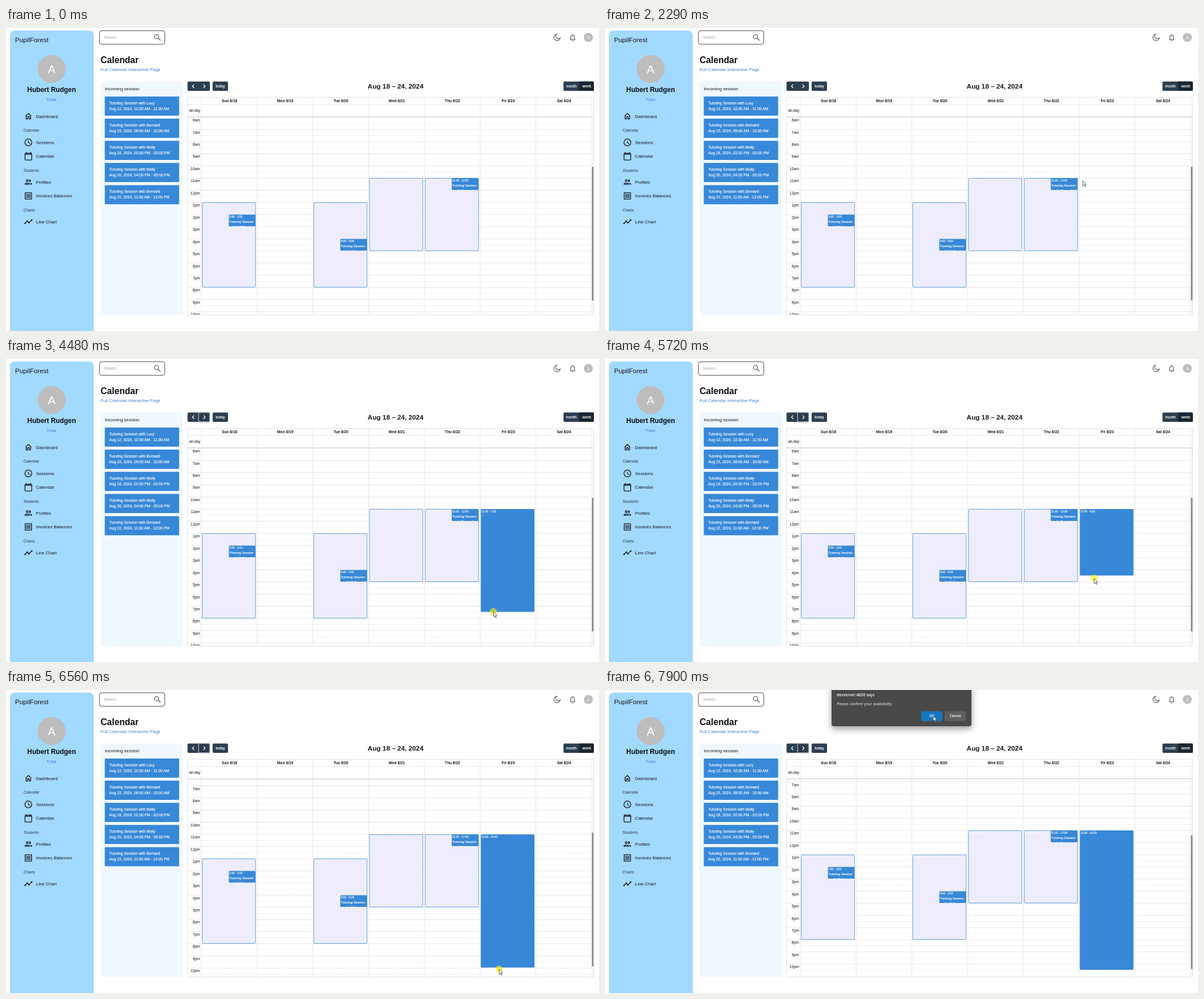
Write an HTML page that moves like this. It is 1047x535 px and loops after 8 s.

```html
<!DOCTYPE html>
<html lang="en">
<head>
<meta charset="utf-8">
<title>Tutor calendar</title>
<style>
html, body { margin: 0; width: 100%; height: 100%; overflow: hidden; background: #fff; }
svg { display: block; font-family: "Liberation Sans", Arial, sans-serif; }
.dialog text { font-family: "Open Sans", sans-serif; }
</style>
</head>
<body>
<svg id="stage" width="1047" height="535" viewBox="0 0 1047 535" xmlns="http://www.w3.org/2000/svg"></svg>
<script>
const LOOP = 8000;
const BLUE = '#3788d8', DARK = '#2c3e50', LINE = '#dddddd', INK = '#14171a';
const TOP = 158, BOTTOM = 506, HOUR = 21.45, SLOT = HOUR / 2, ELEVEN = 265;
const COL0 = 345, COL = 98.43, RIGHT = 1037.5;

const rect = (x, y, w, h, fill, extra = '') =>
  `<rect x="${x}" y="${y}" width="${w}" height="${h}" fill="${fill}" ${extra}/>`;
const line = (x1, y1, x2, y2, extra = '') =>
  `<path d="M${x1} ${y1}L${x2} ${y2}" stroke="${LINE}" stroke-width=".7" fill="none" ${extra}/>`;
// Text is placed by its vertical centre.
const text = (x, cy, s, size, fill = INK, extra = '') =>
  `<text x="${x}" y="${(cy + size * .355).toFixed(2)}" font-size="${size}" fill="${fill}" ${extra}>${s}</text>`;
const bold = 'font-weight="700"', mid = 'text-anchor="middle"';
const firm = 'stroke="#fff" stroke-width=".15"';
const icon = (cx, cy, body, scale = .66, color = INK) =>
  `<g transform="translate(${cx} ${cy}) scale(${scale}) translate(-12 -12)" fill="none" stroke="${color}" stroke-width="2">${body}</g>`;
const path = (d, extra = '') => `<path d="${d}" ${extra}/>`;
const hourY = h => ELEVEN + (h - 11) * HOUR;
const clock = h => `${(Math.floor(h) + 11) % 12 + 1}:${h % 1 ? '30' : '00'}`;
const span = (a, b) => `${clock(a)} - ${clock(b)}`;

function sidebar() {
  const items = [
    [156, 'Dashboard', path('M4.5 11.2L12 4.4l7.5 6.8M6 10.5V19h4v-6h4v6h4v-8.5')],
    [202, 'Sessions', '<circle cx="12" cy="12" r="9.2"/>' + path('M12 7v5.5l4.5 2.8', 'stroke-width="1.7"')],
    [226.5, 'Calendar', '<rect x="3" y="4" width="18" height="18" rx="1.5"/>' + path('M3 7h18M6 1v3M18 1v3')],
    [272, 'Profiles', '<circle cx="9" cy="8.5" r="2.6"/>' +
      path('M3 18v-.8c0-3.2 12-3.2 12 0v.8z') +
      path('M14 5.2a3.5 3.5 0 1 1 0 6.6q1.5-3.3 0-6.6zM16 13.8c3 .4 6 1.5 6 3.5V19h-4v-1.7q0-2-2-3.5z', `fill="${INK}" stroke="none"`)],
    [296.5, 'Invoices Balances', path('M3.5 3v18M20.5 3v18M3 3.5h18M3 20.5h18M6 8h12M6 12h12M6 16h12')],
    [342, 'Line Chart', path('M3 16.5l6-6 4.5 4.5 7.5-7.5') +
      [[3, 16.5], [9, 10.5], [13.5, 15], [21, 7.5]].map(([x, y]) => `<circle cx="${x}" cy="${y}" r="1" fill="${INK}"/>`).join('')]
  ];
  return rect(7, 4.5, 148, 545, '#a2d9ff', 'rx="8"') +
    text(16, 21, 'PupilForest', 11.7) +
    '<circle cx="80.5" cy="72.5" r="24.7" fill="#bdbdbd"/>' +
    text(80.5, 72.5, 'A', 20.5, '#fff', mid) +
    text(80.5, 109, 'Hubert Rudgen', 11.9, '#0c0f12', bold + ' ' + mid) +
    text(80.5, 126, 'Tutor', 7.84, '#3b82d9', mid) +
    items.map(([y, label, body]) => icon(39.5, y, body) + text(53, y, label, 7.9)).join('') +
    [[181, 'Calendar'], [251.5, 'Students'], [322, 'Charts']].map(([y, s]) => text(31, y, s, 6.9, '#2b3a45')).join('');
}

function topBar() {
  return rect(165, 4.8, 115.3, 24, '#fff', 'rx="4" stroke="#333" stroke-width=".9"') +
    text(173, 16.5, 'Search', 6.9, '#a0a0a0') +
    icon(267.5, 16.8, '<circle cx="9.5" cy="9.5" r="5.6"/>' + path('M14 14l6 6', 'stroke-width="2.3"'), .66, '#666') +
    icon(973, 16.5, path('M20.5 14a8.7 8.7 0 1 1-10-10.3 7 7 0 0 0 10 10.3z'), .64, '#666') +
    icon(1000.5, 16.8, path('M5 18h14M7 18v-7c0-7.4 10-7.4 10 0v7M12 5V2.8') +
      path('M10 20.3h4a2 2 0 0 1-4 0z', 'fill="#666" stroke="none"'), .64, '#666') +
    '<circle cx="1028.2" cy="16.7" r="7.9" fill="#bdbdbd"/>' + text(1028.2, 16.8, 'A', 8.2, '#fff', mid) +
    text(167, 56.7, 'Calendar', 15.7, '#0c0f12', bold) +
    text(167, 73.5, 'Full Calendar Interactive Page', 7.87, '#3b82d9');
}

function incoming() {
  const rows = [
    ['Lucy', 'Aug 12, 2024, 10:30 AM - 11:30 AM'],
    ['Bernard', 'Aug 15, 2024, 09:00 AM - 10:00 AM'],
    ['Molly', 'Aug 18, 2024, 02:00 PM - 03:00 PM'],
    ['Molly', 'Aug 20, 2024, 04:00 PM - 05:00 PM'],
    ['Bernard', 'Aug 22, 2024, 11:00 AM - 12:00 PM']
  ];
  return rect(167, 94.5, 145.5, 412.5, '#f0f8ff') +
    text(174.2, 106.7, 'Incoming session', 7.95) +
    rows.map(([who, when], i) => {
      const y = 121 + i * 39.1;
      return rect(174.4, y, 131.3, 33.8, BLUE, 'rx="1"') +
        text(182.2, y + 11.6, 'Tutoring Session with ' + who, 6.72, '#fff', firm) +
        text(182.2, y + 21.6, when, 6.72, '#fff', firm);
    }).join('');
}

function toolbar() {
  const chevron = (x, d) => path(`M${x} 99.6l${d} 3.2l${-d} 3.2`, 'fill="none" stroke="#fff" stroke-width="1.3"');
  return rect(320.5, 94.5, 39.5, 16.6, DARK, 'rx="2"') +
    '<rect id="ring" x="340" y="94.5" width="19.6" height="16.4" rx="2" fill="#2a3b4c" stroke="#97a0aa" stroke-width="1.6"/>' +
    chevron(332.2, -3) + chevron(348.6, 3) +
    rect(364.8, 94.5, 27.2, 16.6, DARK, 'rx="2"') + text(378.4, 102.8, 'today', 6.72, '#fff', mid + ' ' + firm) +
    rect(984.3, 94.5, 53.7, 16.6, DARK, 'rx="2"') +
    path('M1012 94.5h24a2 2 0 0 1 2 2v12.6a2 2 0 0 1-2 2h-24z', 'fill="#1a252f"') +
    text(998.4, 102.8, 'month', 6.72, '#fff', mid + ' ' + firm) + text(1025.3, 102.8, 'week', 6.72, '#fff', mid + ' ' + firm) +
    text(687.8, 102.5, 'Aug 18 – 24, 2024', 11.8, INK, bold + ' ' + mid);
}

function availability(day, from, to) {
  const x = COL0 + day * COL + 1.6, y = hourY(from);
  return rect(x, y + .3, 94, (to - from) * HOUR - .8, '#eeedfd', `rx="1.6" stroke="${BLUE}" stroke-width=".75"`) +
    text(x + 1.4, y + 4, span(from, to), 4.9, '#fff', 'opacity=".75"');
}

function session(day, hour, who) {
  const x = COL0 + day * COL + 48.3, y = hourY(hour), id = 'clip' + day;
  return `<clipPath id="${id}">${rect(x, y, 47.2, 20.9, '#000')}</clipPath><g clip-path="url(#${id})">` +
    rect(x, y, 47.2, 20.9, BLUE, 'rx="1.6"') +
    text(x + 1, y + 4.2, span(hour, hour + 1), 4.9, '#fff', firm) +
    text(x + 1, y + 13, 'Tutoring Session', 5.72, '#fff', firm) +
    text(x + 5.5, y + 21.7, 'with ' + who, 5.72, '#fff', firm) + '</g>';
}

function calendar() {
  const days = ['Sun', 'Mon', 'Tue', 'Wed', 'Thu', 'Fri', 'Sat'];
  let head = '', slots = '';
  days.forEach((d, i) => {
    const x = COL0 + i * COL;
    head += line(x, 122.3, x, BOTTOM) + text(x + COL / 2 + .4, 128.5, `${d} 8/${18 + i}`, 6.65, INK, bold + ' ' + mid);
  });
  head += line(1034.2, 122.3, 1034.2, BOTTOM) + line(320.5, 135, RIGHT, 135) +
    text(343, 145.7, 'all-day', 6.72, INK, 'text-anchor="end"') +
    rect(320.5, 155.7, 717, 2.3, '#e4e4e4');
  for (let h = 5; h < 23; h++) {
    const y = hourY(h);
    slots += line(320.5, y, 1034, y) + line(320.5, y + SLOT, COL0, y + SLOT, 'opacity=".25"') +
      line(COL0, y + SLOT, 1034, y + SLOT, 'stroke-dasharray=".7 .7"') +
      text(342.6, y + 5, `${(h + 11) % 12 + 1}${h < 12 ? 'am' : 'pm'}`, 6.72, INK, 'text-anchor="end"');
  }
  const selX = COL0 + 5 * COL + 1.2;
  return head +
    `<clipPath id="view">${rect(320, TOP, 714.5, BOTTOM - TOP, '#000')}</clipPath>` +
    `<g clip-path="url(#view)"><g id="scroller">${slots}` +
    availability(0, 13, 20) + availability(2, 13, 20) + availability(3, 11, 17) + availability(4, 11, 17) +
    session(0, 14, 'Molly') + session(2, 16, 'Molly') + session(4, 11, 'Bernard') +
    `<g id="selection"><rect id="selBox" x="${selX}" y="${ELEVEN}" width="94.8" height="10" rx="1.6" fill="${BLUE}"/>` +
    text(selX + 1.2, ELEVEN + 4.1, '', 4.9, '#fff', 'id="selLabel" ' + firm) + '</g></g></g>' +
    rect(1034.4, TOP, 3.4, BOTTOM - TOP, '#f7f7f7') +
    '<rect id="thumb" x="1034.5" y="245" width="3.2" height="236" fill="#878787"/>' +
    rect(320.5, 122.3, 717, 384.2, 'none', `stroke="${LINE}" stroke-width=".8"`);
}

function dialog() {
  return '<g id="dialog" class="dialog">' +
    path('M400 -10h247v70q0 4-4 4h-239q-4 0-4-4z', 'fill="#4a4a4a" filter="url(#shadow)"') +
    text(409.3, 8.5, 'devserver:4826 says', 6.9, '#fff', 'font-weight="600"') +
    text(409.3, 24.3, 'Please confirm your availability', 6.72, '#f2f2f2') +
    rect(558.5, 37.5, 37.2, 17.5, '#1675bf', 'rx="2"') + text(577, 46, 'OK', 6.4, '#fff', mid + ' font-weight="600"') +
    rect(600, 37.5, 37.4, 17.5, '#5e5e5e', 'rx="2"') + text(618.7, 46, 'Cancel', 6.2, '#fff', mid + ' font-weight="600"') +
    '</g>';
}

const stage = document.getElementById('stage');
stage.innerHTML =
  `<defs><filter id="shadow" x="-20%" y="-20%" width="140%" height="170%">
    <feDropShadow dx="0" dy="5" stdDeviation="6" flood-color="#000" flood-opacity=".38"/></filter>
  <radialGradient id="glow"><stop offset=".82" stop-color="#ffee00" stop-opacity=".62"/>
    <stop offset="1" stop-color="#ffee00" stop-opacity=".4"/></radialGradient></defs>` +
  rect(0, 0, 1047, 535, '#fff') + sidebar() + topBar() + incoming() + toolbar() + calendar() + dialog() +
  `<g id="pointer"><circle id="halo" r="6.4" fill="url(#glow)"/>` +
  path('M.3 .2V9.3L2.4 7.4 3.9 10.8 5.3 10.2 3.8 6.9H6.5z', 'fill="#fff" stroke="#222" stroke-width=".7" stroke-linejoin="round"') + '</g>';

const el = id => document.getElementById(id);
const show = (id, on) => el(id).setAttribute('visibility', on ? 'visible' : 'hidden');

// Time, x and y of the pointer tip.
const route = [
  [230, 1030, 560], [300, 1005, 527], [450, 940, 430], [620, 882, 346], [780, 855, 300], [920, 859, 283],
  [1050, 859, 283], [1300, 852, 267], [1470, 849.5, 272], [1600, 849.5, 272], [1740, 849, 270.5],
  [2020, 849, 270.5], [2290, 843.5, 269.5], [3080, 843.5, 269.5], [3150, 845, 282], [3430, 856, 347],
  [3930, 858.5, 400], [4480, 860.5, 446], [4760, 861.5, 471], [4830, 861.5, 474], [5000, 862, 465],
  [5420, 863, 392], [5590, 863, 381], [5650, 863, 381], [5720, 863.3, 387], [6000, 866, 440],
  [6300, 870, 488], [6420, 870.5, 492.7], [7050, 870.5, 492.7], [7190, 845, 440], [7330, 797, 357],
  [7470, 706, 220], [7610, 632, 112], [7760, 590, 61], [7900, 579.3, 45.5]
];
const RELEASE = 6840, SCROLL_MAX = 17;

function tip(t) {
  const i = route.findIndex(p => p[0] > t);
  if (i === 0) return route[0].slice(1);
  if (i < 0) return route[route.length - 1].slice(1);
  const [a, ax, ay] = route[i - 1], [b, bx, by] = route[i], k = (t - a) / (b - a);
  return [ax + (bx - ax) * k, ay + (by - ay) * k];
}
const scrollAt = t => Math.max(0, Math.min(SCROLL_MAX, (t - 6350) / 21));

function draw(t) {
  const [x, y] = tip(t), scroll = scrollAt(t), held = t >= 2750 && t < RELEASE;
  el('pointer').setAttribute('transform', `translate(${x} ${y})`);
  show('halo', held);
  show('ring', t >= 2750);
  show('selection', t >= 2750);
  show('dialog', t >= 6910);
  el('scroller').setAttribute('transform', `translate(0 ${-scroll})`);
  el('thumb').setAttribute('y', 245 + scroll * .68);

  // The selection trails the pointer slightly and snaps to half hours.
  const seen = Math.min(t, RELEASE) - 70;
  const slots = Math.max(1, Math.ceil((tip(seen)[1] + scrollAt(seen) - ELEVEN) / SLOT));
  el('selBox').setAttribute('height', slots * SLOT - .8);
  el('selLabel').textContent = span(11, 11 + slots / 2);
}

const start = performance.now();
function tick() {
  draw((performance.now() - start) % LOOP);
  requestAnimationFrame(tick);
}
tick();
</script>
</body>
</html>
```
